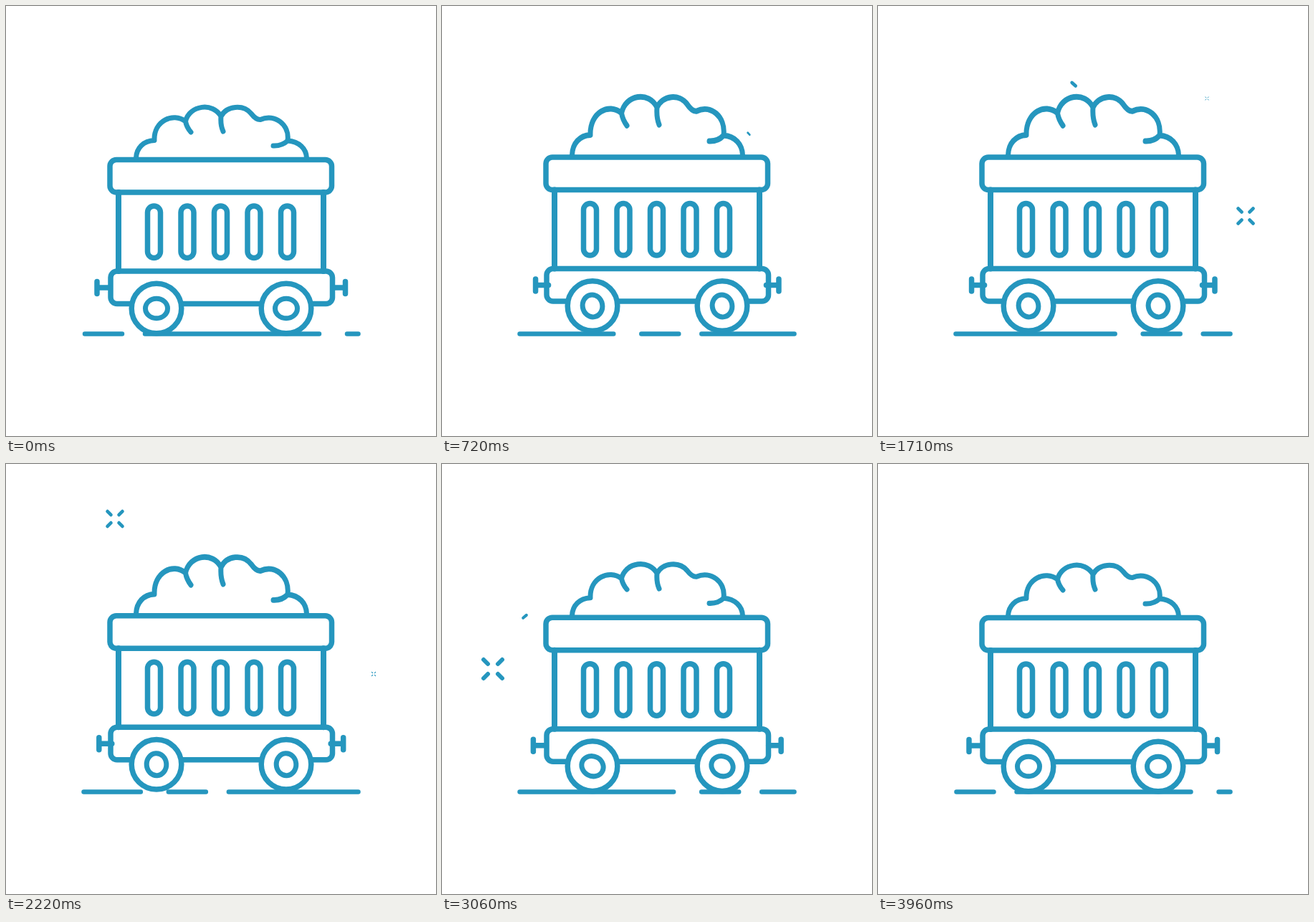
An HTML page for the animation above (3.99 s loop, 600x600 px).

```html
<!DOCTYPE html>
<html lang="en">
<head>
<meta charset="utf-8">
<title>Coal wagon</title>
<style>
  html, body { margin: 0; width: 100%; height: 100%; overflow: hidden; background: #fff; }
  svg { display: block; width: 100%; height: 100%; }
</style>
</head>
<body>
<svg viewBox="0 0 600 600" fill="none" stroke="#2596be" stroke-width="7.5" stroke-linecap="round" stroke-linejoin="round">
  <path id="rail" d="M108.5 457.5H491.5" stroke-width="6.5" stroke-dasharray="52 32 243 39"/>
  <g id="car">
    <path d="M157 260V370M443 260V370" stroke-width="8"/>
    <g id="slots"></g>
    <rect x="145" y="214.5" width="309.5" height="45.5" rx="9"/>
    <rect x="146" y="370" width="309.5" height="45.5" rx="9"/>
    <path id="leftCoupler" d="M127 384.5V401.5M127 393H145"/>
    <path id="rightCoupler" d="M473.5 384.5V401.5M473.5 393H456"/>
    <g id="wheels"></g>
  </g>
  <path id="coal" stroke-width="7" d="M181.5 212C182 198 192 188 207 187.500
    C206 160 233 148 250.500 161Q252 169 258 176
    M250.500 161C256 138 289 134 300 154Q299 166 303 175
    M300 154C308 139 331 137 342 150Q349 159 355 158.500
    C375 150 396 165 393 188Q385 195.500 373 195
    M393 188C409 189 419 199 419.500 212"/>
  <g id="effects"></g>
</svg>
<script>
const LOOP = 3990;
const TICK = 30;
const CENTER_X = [210, 391];

const byId = id => document.getElementById(id);

function add(parent, tag, attrs) {
  const el = document.createElementNS("http://www.w3.org/2000/svg", tag);
  for (const name in attrs) el.setAttribute(name, attrs[name]);
  return parent.appendChild(el);
}

const place = (el, transform) => el.setAttribute("transform", transform);

for (let i = 0; i < 5; i++) {
  add(byId("slots"), "rect", { x: 197.5 + 46.5 * i, y: 279, width: 18, height: 72.5, rx: 9 });
}

const hubs = CENTER_X.map(cx => {
  add(byId("wheels"), "circle", { cx, cy: 422, r: 34.8, fill: "#fff" });
  return add(byId("wheels"), "ellipse", { cx, cy: 422, rx: 15.5, ry: 13.8, "stroke-width": 7 });
});

// Position, and the step at which each sparkle appears
const sparkles = [
  { x: 459, y: 129, start: 25.8 },
  { x: 513, y: 293, start: 39 },
  { x: 152, y: 76.5, start: 52 },
  { x: 71, y: 286, start: 65.5 }
];

// Bits of coal thrown off: first position and velocity per step
const bits = [
  { x: 422.5, y: 176, vx: 2.73, vy: 1.1, tilt: 48, start: 16 },
  { x: 281, y: 116, vx: -2.3, vy: -2, tilt: 42, start: 39.6 },
  { x: 148, y: 185.500, vx: -2.5, vy: 2.1, tilt: -40, start: 64 }
];

const SPARKLE_PATH = "M7 7L13 13M-7 7L-13 13M7 -7L13 -13M-7 -7L-13 -13";
for (const s of sparkles) s.el = add(byId("effects"), "path", { d: SPARKLE_PATH, "stroke-width": 6 });
for (const b of bits) b.el = add(byId("effects"), "path", { d: "M-4 0H4", "stroke-width": 5.5 });

// Grows, holds and shrinks again
const pulse = (age, life, ramp) => Math.max(0, Math.min(1, age / ramp, (life - age) / ramp));

function show(el, size, transform) {
  el.setAttribute("visibility", size > 0.02 ? "visible" : "hidden");
  place(el, `${transform} scale(${size})`);
}

function draw(time) {
  const tick = Math.floor((time % LOOP) / TICK);
  const step = Math.ceil((tick + 0.67) / 1.3225) - 1;
  const seconds = step / 25;
  const lift = (1 - Math.cos(2 * Math.PI * seconds)) / 2;
  const rise = 6 * lift;

  byId("rail").setAttribute("stroke-dashoffset", 10.985 * step - 1.5);
  place(byId("car"), `translate(0 ${-rise})`);
  place(byId("leftCoupler"), `translate(${rise} 0)`);
  place(byId("rightCoupler"), `translate(${-rise} 0)`);
  place(byId("coal"), `translate(0 ${214.5 - rise}) scale(1 ${1 + 0.248 * lift}) translate(0 -214.5)`);
  hubs.forEach((hub, i) => place(hub, `rotate(${360 * seconds} ${CENTER_X[i]} 422)`));

  for (const s of sparkles) {
    show(s.el, pulse(step - s.start, 18, 5), `translate(${s.x} ${s.y})`);
  }
  for (const b of bits) {
    const age = step - b.start;
    show(b.el, pulse(age, 16, 4), `translate(${b.x + b.vx * age} ${b.y + b.vy * age}) rotate(${b.tilt})`);
  }
}

const begin = performance.now();
function tickFrame() {
  draw(performance.now() - begin);
  requestAnimationFrame(tickFrame);
}
tickFrame();
</script>
</body>
</html>
```
